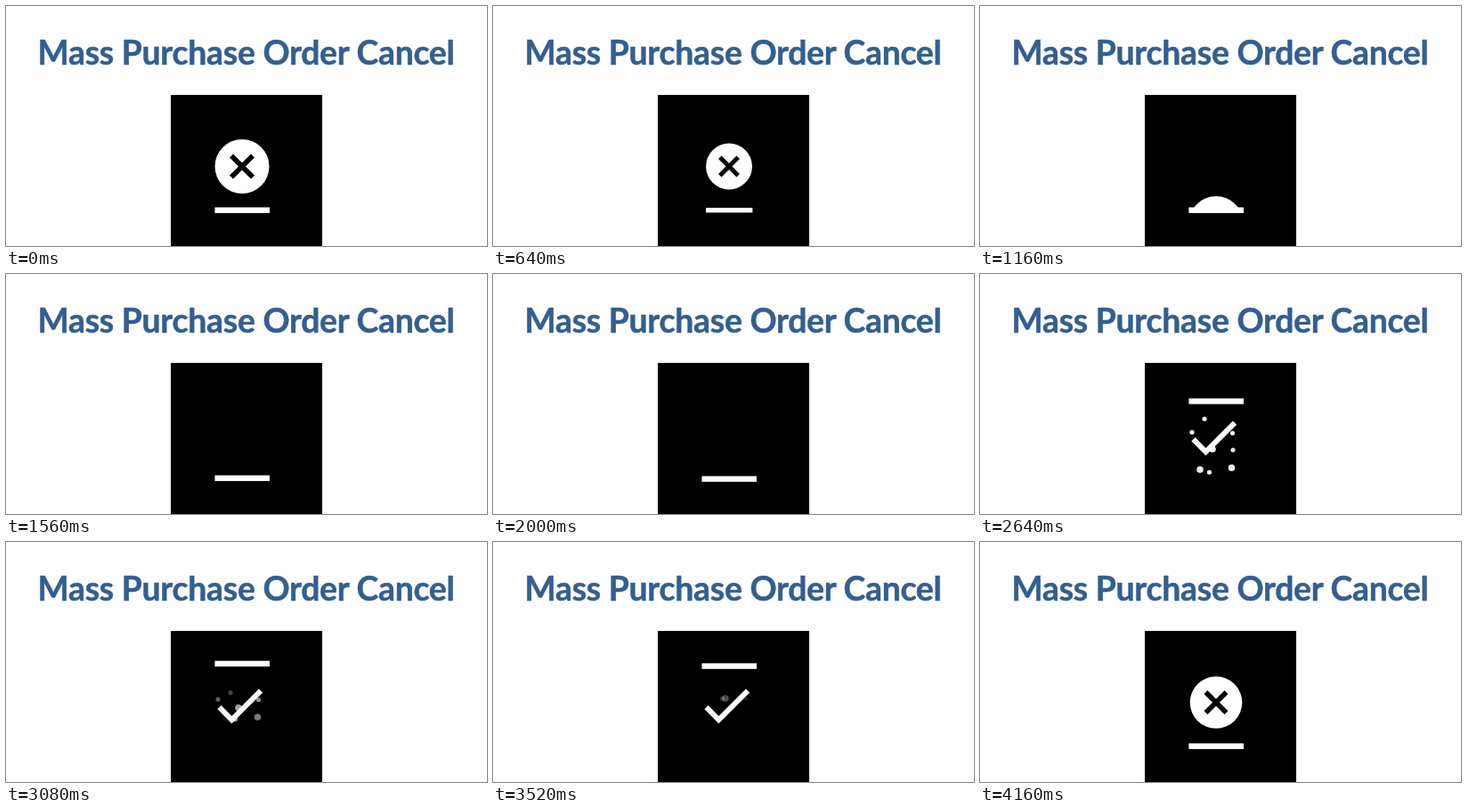
Animation of 540 by 270 pixels, one loop 4840 ms. Source, as an HTML page:

```html
<!DOCTYPE html>
<html lang="en">
<head>
<meta charset="utf-8">
<title>Mass Purchase Order Cancel</title>
<style>
  html, body { margin: 0; width: 100%; height: 100%; overflow: hidden; background: #fff; }
  svg { display: block; width: 540px; height: 270px; }
  text {
    font: 700 37.33px Lato, sans-serif; letter-spacing: -0.25px; text-anchor: middle;
    fill: #335f90; stroke: #335f90; stroke-width: 0.5px;
  }
</style>
</head>
<body>
<svg viewBox="0 0 540 270">
  <clipPath id="above"><rect id="top" x="185" y="100" width="170"/></clipPath>
  <clipPath id="below"><rect id="bottom" x="185" width="170" height="170"/></clipPath>
  <text x="269.5" y="66">Mass Purchase Order Cancel</text>
  <rect x="185" y="100" width="170" height="170"/>
  <g clip-path="url(#above)">
    <g id="disc">
      <circle r="30.5" fill="#fff"/>
      <path d="M-12-12L12 12M12-12L-12 12" stroke="#000" stroke-width="5.8"/>
    </g>
  </g>
  <g clip-path="url(#below)">
    <path d="M239.5 185.8L253.4 200L286 167.3" fill="none" stroke="#fff" stroke-width="6"/>
    <g id="dots" fill="#fff"></g>
  </g>
  <rect id="bar" x="-30.75" y="-3.2" width="61.5" height="6.4" fill="#fff"/>
</svg>
<script>
const LOOP = 4840, STEP = 40, FLOOR = 229.7, PERCH = 140.2;
const $ = id => document.getElementById(id);
const set = (el, attrs) => { for (const k in attrs) el.setAttribute(k, attrs[k]); };
const mix = (a, b, k) => a + (b - a) * k;
const ramp = (t, from, to) => Math.min(1, Math.max(0, (t - from) / (to - from)));
const ease = u => u * u * (3 - 2 * u);
const arc = (t, from, to) => Math.sin(Math.PI * ramp(t, from, to));

const press = t => 1 - 0.15 * arc(t, 440, 820);

// The disc hops, then drops behind the bar
const discY = t => 180.5 - 17.5 * ease(ramp(t, 680, 820)) + 114 * ramp(t, 820, 1260) ** 1.3;

function barY(t) {
  const s = t - 2070;
  if (s < 0) { // hit, rebound, settle
    return FLOOR + 12.7 * arc(t, 1240, 1480) - 17.5 * arc(t, 1560, 1760) + 7 * arc(t, 1760, 2010);
  }
  const spring = Math.exp(-s / 170) * Math.cos(Math.PI * s / 300);
  const perch = mix(PERCH, FLOOR, spring) - 3.5 * arc(t, 2800, 3560);
  return mix(perch, FLOOR, ease(ramp(t, 3740, 4020)));
}

const dots = [
  [261, 197], [257.5, 223], [283.5, 179], [282.5, 218],
  [238, 178], [252, 163], [247, 220], [284, 198]
].map(([x, y], i) => {
  const el = document.createElementNS("http://www.w3.org/2000/svg", "circle");
  set(el, { r: i % 3 ? 2.6 : 3.8 });
  $("dots").append(el);
  return { el, x, y };
});

function draw(t) {
  const y = barY(t), p = press(t);
  const back = t > 2000;
  const size = back ? 0.96 * ease(ramp(t, 3920, 4160)) : p;
  set($("bar"), { transform: `translate(265.2 ${y}) scale(${p})` });
  set($("top"), { height: y - 100 });
  set($("bottom"), { y });
  set($("disc"), { transform: `translate(265 ${back ? 180.5 : discY(t)}) scale(${size})` });

  // Dots burst out, drift level and fade one after another
  const out = ease(ramp(t, 2240, 2640)), drift = ramp(t, 2640, 3520);
  dots.forEach((dot, i) => set(dot.el, {
    cx: mix(265, dot.x, out),
    cy: mix(190, mix(dot.y, 176, drift), out),
    opacity: out * (1 - ramp(t, 2600, 3900 - 130 * i))
  }));
}

const start = performance.now();
function frame() {
  const t = (performance.now() - start) % LOOP;
  draw(Math.floor(t / STEP) * STEP);
  requestAnimationFrame(frame);
}
frame();
</script>
</body>
</html>
```
